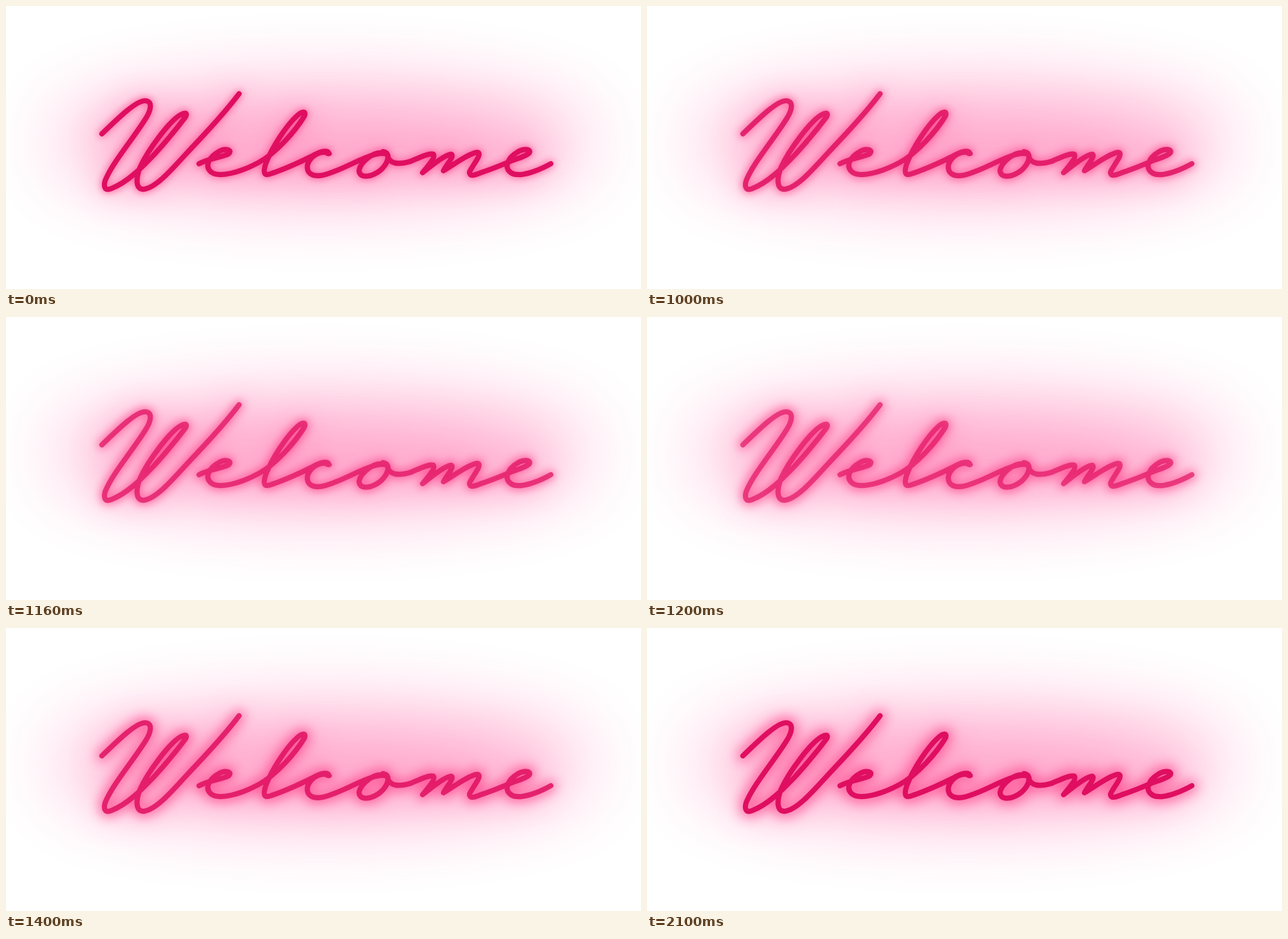
An HTML page that plays this animation: 1000x445 px, repeating every 2.5 s.

```html
<!DOCTYPE html>
<html lang="en">
<head>
<meta charset="utf-8">
<title>Neon welcome</title>
<style>
  html, body { margin: 0; height: 100%; overflow: hidden; background: #fff; }
  svg { display: block; width: 100vw; height: 100vh; }
  .script { fill: none; stroke-linecap: round; stroke-linejoin: round; }
</style>
</head>
<body>
<svg viewBox="0 0 1000 445" role="img" aria-label="Welcome">
  <defs>
    <filter id="wide" filterUnits="userSpaceOnUse" x="-200" y="-200" width="1400" height="845" color-interpolation-filters="sRGB">
      <feGaussianBlur stdDeviation="60"/>
    </filter>
    <filter id="middle" filterUnits="userSpaceOnUse" x="-100" y="-100" width="1200" height="645" color-interpolation-filters="sRGB">
      <feGaussianBlur stdDeviation="26"/>
    </filter>
    <filter id="near" filterUnits="userSpaceOnUse" x="0" y="0" width="1000" height="445" color-interpolation-filters="sRGB">
      <feGaussianBlur id="blur" stdDeviation="6"/>
    </filter>
  </defs>
  <ellipse cx="498" cy="214" rx="415" ry="78" fill="#ff4291" opacity=".48" filter="url(#wide)"/>
  <path id="bloom" class="script" stroke="#ff4291" stroke-width="14" opacity=".38" filter="url(#middle)"/>
  <path id="halo" class="script" stroke="#ff3c86" opacity=".7" filter="url(#near)"/>
  <path id="ink" class="script" stroke="#df0e60" stroke-width="8.2"/>
</svg>
<script>
const letters = {
  W: "M151 201C175 178 204 149 219 149C231 149 229 163 220 177C198 212 167 247 156 275C153 286 157 291 166 287" +
     "C191 277 212 256 233 234C254 211 274 186 283 174C286 168 282 167 275 171C258 180 223 227 211 254" +
     "C204 272 204 290 218 288C237 285 261 257 285 231C311 203 340 174 367 138",
  e: "M304 248C320 239 342 238 351 232C357 226 345 223 335 229C320 237 312 252 323 261C336 271 370 261 398 246",
  l: "C426 231 456 196 470 173C473 165 467 165 459 172C442 187 419 222 409 248C404 264 407 268 419 263" +
     "C440 256 462 246 482 236C494 229 506 225 509 232",
  c: "M507 232C497 226 480 235 475 249C472 264 484 269 499 266C521 261 545 247 565 239C577 234 588 230 597 232",
  o: "C580 226 557 246 556 259C557 273 578 268 590 258C602 247 607 231 594 229M600 234C604 249 618 250 638 244",
  m: "C652 238 666 231 673 233C677 238 664 252 656 262C674 248 690 235 701 233C707 236 693 250 689 259" +
     "C706 249 728 232 742 230C752 231 734 251 730 261C729 269 739 266 748 262C764 257 778 251 790 246",
  lastE: "C800 241 817 238 824 231C828 224 814 224 805 230C791 238 783 254 795 262C808 271 838 259 858 248"
};
const [ink, halo, bloom, blur] = ["ink", "halo", "bloom", "blur"].map(id => document.getElementById(id));
const word = Object.values(letters).join("");
for (const path of [ink, halo, bloom]) path.setAttribute("d", word);

const LOOP = 2500, STEPS = 6;

function draw() {
  const time = performance.now() % LOOP;
  const step = Math.min(STEPS, Math.max(0, Math.floor((time - 900) / 100)));
  const progress = step / STEPS;
  ink.setAttribute("opacity", 1 - 0.34 * Math.sin(Math.PI * progress));
  halo.setAttribute("stroke-width", 11 + 7 * progress);
  blur.setAttribute("stdDeviation", 6 + 3.5 * progress);
  requestAnimationFrame(draw);
}
draw();
</script>
</body>
</html>
```
